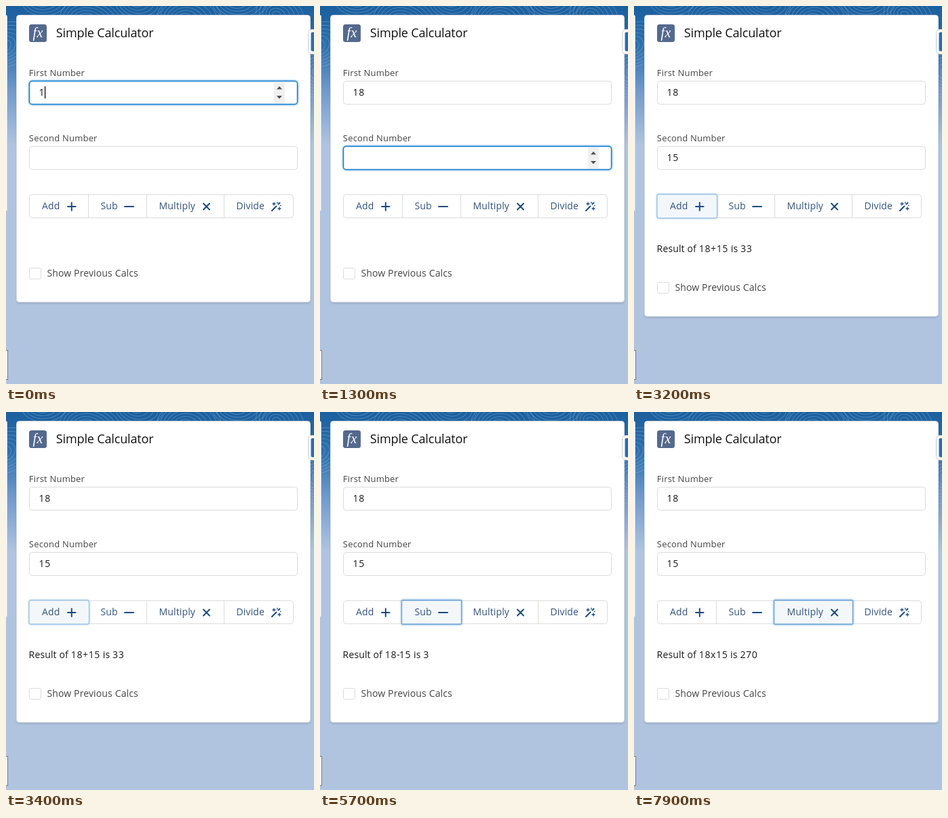
Animation, 454 px wide and 556 px high, one loop 8000 ms. Source, as an HTML page:

```html
<!DOCTYPE html>
<html lang="en">
<head>
<meta charset="utf-8">
<title>Simple Calculator</title>
<style>
html, body { margin: 0; width: 100%; height: 100%; overflow: hidden; background: #b0c4df; }
svg { display: block; width: 454px; height: 556px; }
text { font: 14px "Open Sans", "Noto Sans", sans-serif; letter-spacing: .14px; fill: #444; }
.title { font-size: 18px; letter-spacing: -.15px; fill: #111; }
.label { font-size: 13px; letter-spacing: .2px; }
.dark, .num { fill: #181818; }
.num { letter-spacing: .65px; }
.minus { letter-spacing: -.7px; }
.fx { font: italic 20px "Liberation Serif", "Noto Serif", serif; letter-spacing: .5px; fill: #fff; }
.act text { fill: #34547f; }
.icon { fill: none; stroke: #1b4a80; stroke-width: 2; stroke-linecap: round; }
.fine { stroke-width: 1.3; }
.box { fill: #fff; stroke: #dddbda; }
.ring { fill: #fff; stroke: #1b7fcc; stroke-width: 1.5; filter: drop-shadow(0 0 1.5px #2f92e0); }
.press { fill: #f3f7fa; stroke: #6fa5d8; stroke-width: 1.4; filter: drop-shadow(0 0 1.5px #5a9edb); }
.soft { stroke: #a3c8e6; filter: drop-shadow(0 0 1px #8fc0e6); }
.card { fill: #fff; stroke: #d5dae2; height: 422px; filter: drop-shadow(0 2px 1px rgba(0,0,0,.1)); }

/* 8 s timeline, hard steps */
.t { animation: 8s step-end infinite; }
.card { animation-name: grow; }
.drop { animation-name: drop; }
.eight { animation-name: eight; }
.in1 { animation-name: in1; }
.in2 { animation-name: in2; }
.one { animation-name: one; }
.five { animation-name: five; }
.caret1 { animation-name: caret1; }
.caret2 { animation-name: caret2; }
.add { animation-name: add; }
.sub { animation-name: sub; }
.mul { animation-name: mul; }
.sum { animation-name: sum; }
.diff { animation-name: diff; }
.prod { animation-name: prod; }
@keyframes grow { 0% { height: 422px } 39.9%, 100% { height: 443px } }
@keyframes drop { 0% { transform: none } 39.9%, 100% { transform: translateY(21px) } }
@keyframes eight { 0% { opacity: 0 } 2.4%, 100% { opacity: 1 } }
@keyframes in1 { 0% { opacity: 1 } 7.4%, 100% { opacity: 0 } }
@keyframes in2 { 0% { opacity: 0 } 7.4% { opacity: 1 } 26.15%, 100% { opacity: 0 } }
@keyframes one { 0% { opacity: 0 } 19.9%, 100% { opacity: 1 } }
@keyframes five { 0% { opacity: 0 } 21.15%, 100% { opacity: 1 } }
@keyframes caret1 { 0% { transform: translateX(9px) } 2.4%, 100% { transform: translateX(18px) } }
@keyframes caret2 {
  0% { opacity: 1; transform: none }
  13.65% { opacity: 0; transform: none }
  19.9% { opacity: 1; transform: translateX(9px) }
  21.15%, 100% { opacity: 1; transform: translateX(18px) }
}
@keyframes add { 0% { opacity: 0 } 26.15% { opacity: 1 } 53.65%, 100% { opacity: 0 } }
@keyframes sub { 0% { opacity: 0 } 53.65% { opacity: 1 } 73.65%, 100% { opacity: 0 } }
@keyframes mul { 0% { opacity: 0 } 73.65%, 100% { opacity: 1 } }
@keyframes sum { 0% { opacity: 0 } 39.9% { opacity: 1 } 61.15%, 100% { opacity: 0 } }
@keyframes diff { 0% { opacity: 0 } 61.15% { opacity: 1 } 84.9%, 100% { opacity: 0 } }
@keyframes prod { 0% { opacity: 0 } 84.9%, 100% { opacity: 1 } }
</style>
</head>
<body>
<svg viewBox="0 0 454 556">
  <defs>
    <linearGradient id="sky" x1="0" y1="0" x2="0" y2="1">
      <stop offset="0" stop-color="#1b5f9e"/>
      <stop offset=".3" stop-color="#2f71af"/>
      <stop offset=".6" stop-color="#7099ca"/>
      <stop offset="1" stop-color="#b0c4df"/>
    </linearGradient>
    <clipPath id="top"><rect width="454" height="170"/></clipPath>
    <g id="spin">
      <rect x="395" y="2" width="16" height="31" fill="#f0f0f0"/>
      <path d="M399 12.5l4-4.5 4 4.5zM399 22l4 4.5 4-4.5z" fill="#505050"/>
    </g>
  </defs>

  <rect width="454" height="556" fill="#b0c4df"/>
  <rect width="454" height="205" fill="url(#sky)"/>
  <g id="topo" clip-path="url(#top)" fill="none" stroke="#9cc2e4" stroke-opacity=".36"/>
  <rect x="-4" y="13.5" width="5.5" height="288" rx="2" fill="#fff" stroke="#d5dae2"/>
  <rect x="-4" y="506.5" width="6.5" height="43" fill="#fff" stroke="#777"/>

  <rect class="t card" x="15.5" y="13.5" width="433" rx="4"/>
  <rect x="445.5" y="34.5" width="20" height="36" rx="5" fill="#fff" stroke="#c9ced6"/>
  <rect x="449.5" y="38.5" width="14" height="28" rx="2" fill="#2c6cab"/>

  <rect x="34" y="27" width="26" height="26" rx="3.5" fill="#54698d"/>
  <text class="fx" x="39.5" y="46">fx</text>
  <text class="title" x="73.8" y="46">Simple Calculator</text>

  <text class="label" x="33.8" y="103">First Number</text>
  <rect class="box" x="34.5" y="110.5" width="395" height="34" rx="4"/>
  <g class="t in1">
    <rect class="ring" x="34.5" y="110.5" width="395" height="34" rx="4"/>
    <use href="#spin" y="110"/>
    <rect class="t caret1" x="48" y="118" width="1.2" height="18"/>
  </g>
  <text class="num" x="48.4" y="132">1</text>
  <text class="num t eight" x="57.2" y="132">8</text>

  <text class="label" x="33.8" y="199">Second Number</text>
  <rect class="box" x="34.5" y="206.5" width="395" height="34" rx="4"/>
  <g class="t in2">
    <rect class="ring" x="34.5" y="206.5" width="395" height="34" rx="4"/>
    <use href="#spin" y="206"/>
    <rect class="t caret2" x="48" y="215" width="1.2" height="18"/>
  </g>
  <text class="num t one" x="48.4" y="228">1</text>
  <text class="num t five" x="57.2" y="228">5</text>

  <g class="act">
    <rect class="box" x="34.5" y="277.5" width="389" height="34" rx="4"/>
    <path d="M121.5 278v33M207.5 278v33M321.5 278v33" stroke="#dddbda"/>
    <rect class="press soft t add" x="34" y="277" width="88.5" height="35" rx="3"/>
    <rect class="press t sub" x="120.5" y="277" width="88" height="35" rx="1"/>
    <rect class="press t mul" x="206.5" y="277" width="116" height="35" rx="1"/>
    <text x="53" y="299">Add</text>
    <text x="139.5" y="299">Sub</text>
    <text x="225.5" y="299">Multiply</text>
    <text x="339.5" y="299">Divide</text>
    <path class="icon" d="M91 295h11.5M96.75 289.25v11.5M175 295h13M291 290.5l9 9M300 290.5l-9 9"/>
    <path class="icon" d="M392 301l6.5-6.5M401.5 291.5l2-2"/>
    <path class="icon fine" d="M395 289v4M393 291h4M403 296v4M401 298h4M400 288.5v1.5M404.5 293.5h.5"/>
  </g>

  <text class="dark t sum" x="33.6" y="362">Result of <tspan class="num">18+15</tspan> is <tspan class="num">33</tspan></text>
  <text class="dark t diff" x="33.6" y="362">Result of <tspan class="num">18</tspan><tspan class="minus">-</tspan><tspan class="num">15</tspan> is <tspan class="num">3</tspan></text>
  <text class="dark t prod" x="33.6" y="362">Result of <tspan class="num">18x15</tspan> is <tspan class="num">270</tspan></text>

  <g class="t drop">
    <rect class="box" x="34.5" y="385.5" width="17" height="16" rx="2"/>
    <text x="60.4" y="398">Show Previous Calcs</text>
  </g>
</svg>
<script>
// Contour lines: nested, slightly tilted ellipses around a few hills
const hills = [[-6, 60, 7], [52, -12, 6], [118, 24, 8], [190, -8, 6], [262, 20, 8], [338, -10, 7], [398, 12, 6], [462, 96, 9]];
const topo = document.getElementById("topo");
for (const [x, y, n] of hills) {
  for (let i = 1; i <= n; i++) {
    const e = document.createElementNS("http://www.w3.org/2000/svg", "ellipse");
    const at = { cx: x + i, cy: y, rx: i * 6, ry: i * 4.5, transform: `rotate(${x % 40 - 20} ${x} ${y})` };
    for (const k in at) e.setAttribute(k, at[k]);
    topo.append(e);
  }
}
</script>
</body>
</html>
```
